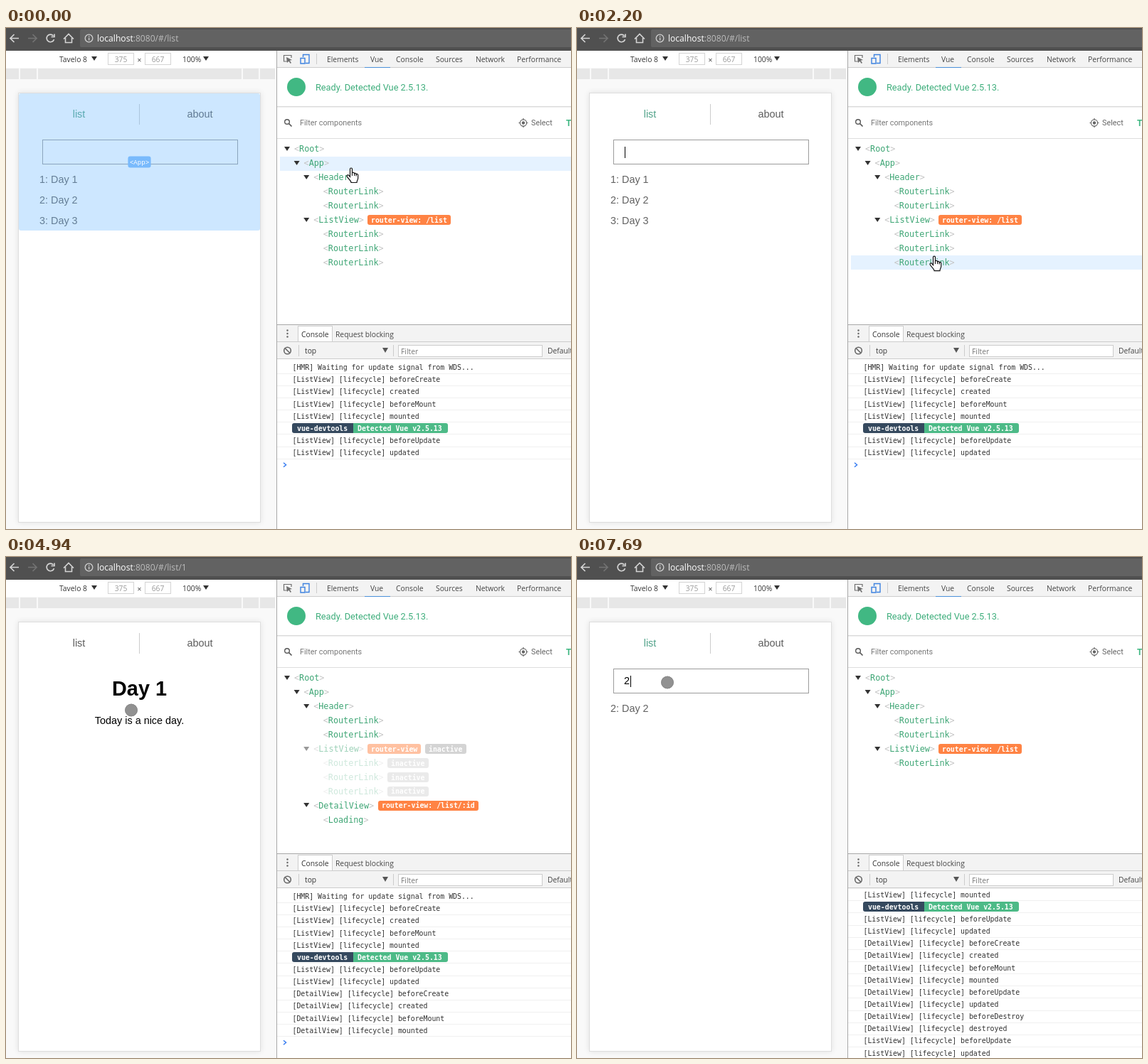
An HTML page with a canvas that plays this animation: 794x705 px, repeating every 8 s.

```html
<!DOCTYPE html>
<html lang="en">
<head>
<meta charset="utf-8">
<title>Component inspector</title>
<style>
  html, body { margin: 0; width: 100%; height: 100%; overflow: hidden; background: #fff; }
  canvas { display: block; }
</style>
</head>
<body>
<canvas id="stage" width="794" height="705"></canvas>
<script>
const c = document.getElementById('stage').getContext('2d');
const LOOP = 8000;
const UI = '10.3px "Open Sans", sans-serif';
const URL_FONT = '12.1px "Open Sans", sans-serif';
const PAGE = '14.4px "Liberation Sans", sans-serif';
const MONO = '9.87px "DejaVu Sans Mono", monospace';
const TREE = '11.75px "DejaVu Sans Mono", monospace';
const LABEL = '9.05px "Liberation Mono", monospace';
const GREEN = '#41b883', LINE = '#cccccc', BAR = '#f3f3f3';
const TREE_TOP = 160.7, ROW_H = 19.93, LOG_H = 17.15;

// time, x, y of the pointer
const path = [
  [0, 485, 197], [730, 485, 197], [1440, 498, 239], [1560, 498, 239],
  [2200, 502, 321], [2350, 503, 333], [2760, 503, 333], [2810, 502, 332],
  [2980, 502, 332], [3280, 395, 284], [3750, 176, 215], [5410, 176, 215],
  [5880, 122, 127], [6680, 122, 127], [7060, 127, 176], [LOOP, 127, 176]
];
const caretFlips = [260, 730, 1180, 1690, 2200, 2760, 3280, 3750];

// page area belonging to each tree row: x, y, width, height, name
const targets = [
  [18, 92, 339, 193, 'Root'], [18, 92, 339, 193, 'App'], [18, 107, 339, 29, 'Header'],
  [18, 107, 170, 29, 'RouterLink'], [188, 107, 169, 29, 'RouterLink'],
  [18, 136, 339, 149, 'ListView'],
  ...[0, 1, 2].map(i => [47, 199 + 29 * i, 281, 29, 'RouterLink'])
];

const cycle = (name, ...hooks) => hooks.map(h => `[${name}] [lifecycle] ${h}`);
const logs = [
  '[HMR] Waiting for update signal from WDS...',
  ...cycle('ListView', 'beforeCreate', 'created', 'beforeMount', 'mounted'),
  null, // version badge
  ...cycle('ListView', 'beforeUpdate', 'updated'),
  ...cycle('DetailView', 'beforeCreate', 'created', 'beforeMount', 'mounted',
    'beforeUpdate', 'updated', 'beforeDestroy', 'destroyed'),
  ...cycle('ListView', 'beforeUpdate', 'updated')
];

const handShape = new Path2D('M-1.5 1.5C-1.5-.5 1.5-.5 1.5 1.5V7C2 5.8 4.6 6 4.6 8C5 6.8 7.2 7 7.2 9' +
  'C8 8 9.7 8.4 9.7 10V14C9.7 17 8 17.5 8 20.5H0C0 17.5-5 14.5-6 11.5C-6.3 10-4 9-2.8 11L-1.5 12.5Z');

function text(s, x, y, font, color, align = 'left') {
  c.font = font;
  c.fillStyle = color;
  c.textAlign = align;
  c.fillText(s, x, Math.round(y));
}
function rect(x, y, w, h, color) {
  c.fillStyle = color;
  c.fillRect(x, y, w, h);
}
function frame(x, y, w, h, color, fill = '#fff') {
  rect(x, y, w, h, color);
  rect(x + 1, y + 1, w - 2, h - 2, fill);
}
function round(x, y, w, h, r, color) {
  c.fillStyle = color;
  c.beginPath();
  c.roundRect(x, y, w, h, r);
  c.fill();
}
function stroke(d, color, width = 1.5) {
  c.strokeStyle = color;
  c.lineWidth = width;
  c.stroke(new Path2D(d));
}
function disc(x, y, r, color) {
  c.fillStyle = color;
  c.beginPath();
  c.arc(x, y, r, 0, 7);
  c.fill();
}
function ring(x, y, r, color, width = 1.3) {
  c.strokeStyle = color;
  c.lineWidth = width;
  c.beginPath();
  c.arc(x, y, r, 0, 7);
  c.stroke();
}
function arrowDown(x, y, w = 8, h = 6, color = '#333') {
  c.fillStyle = color;
  c.fill(new Path2D(`M${x} ${y}h${w}l${-w / 2} ${h}z`));
}

function pointer(t) {
  const i = Math.max(1, path.findIndex(p => p[0] > t));
  const [t0, x0, y0] = path[i - 1], [t1, x1, y1] = path[i];
  const k = (t - t0) / (t1 - t0);
  return [x0 + (x1 - x0) * k, y0 + (y1 - y0) * k];
}
function hoverRow(t) {
  const [x, y] = pointer(Math.max(0, t));
  return x < 385 ? -1 : Math.floor((y - TREE_TOP) / ROW_H);
}
const logCount = t => t < 4070 ? 8 : t < 5010 ? 12 : t < 6030 ? 14 : t < 7690 ? 16 : 18;

function addressBar(detail) {
  rect(0, 0, 794, 32, '#505050');
  round(104, 2, 700, 25, 2, '#626262');
  stroke('M18 14.5H6M11.5 9L6 14.5L11.5 20', '#d4d4d4', 1.7);
  stroke('M31 14.5H43M37.5 9L43 14.5L37.5 20', '#737373', 1.7);
  stroke('M66.5 11A5.3 5.3 0 1 0 67.5 16M68 8.5V12.5H63.5', '#d4d4d4', 1.7);
  stroke('M81 15.5L88 8.5L95 15.5M83.5 14V20.5H92.5V14', '#d4d4d4', 1.6);
  ring(116.5, 14.5, 5.3, '#d0d0d0');
  rect(116, 13.5, 1.3, 4, '#d0d0d0');
  rect(116, 11, 1.3, 1.3, '#d0d0d0');
  text('localhost', 128, 19, URL_FONT, '#fff');
  const x = 128 + c.measureText('localhost').width;
  text(':8080/#/list' + (detail ? '/1' : ''), x, 19, URL_FONT, '#bcbcbc');
}

function deviceChrome() {
  rect(0, 32, 380, 673, '#f9f9f9');
  rect(0, 32, 380, 24, '#fff');
  text('Tavelo 8', 75, 48, UI, '#333');
  arrowDown(120, 40);
  frame(143, 35, 37, 17, '#d4d4d4');
  frame(195, 35, 37, 17, '#d4d4d4');
  text('375', 161.5, 48, UI, '#999', 'center');
  text('667', 213.5, 48, UI, '#999', 'center');
  text('×', 187.5, 49, UI, '#444', 'center');
  text('100%', 248, 48, UI, '#333');
  arrowDown(277, 40);
  for (const [a, b] of [[0, 18], [20, 43], [45, 331], [333, 355], [357, 378]])
    rect(a, 57, b - a, 15, '#e7e7e7');
  c.shadowColor = 'rgba(0,0,0,.1)';
  c.shadowBlur = 8;
  rect(17, 91, 341, 605, '#dedede');
  c.shadowColor = 'transparent';
  rect(18, 92, 339, 603, '#fff');
}

function page(t, detail) {
  text('list', 102.5, 126, PAGE, detail ? '#5c5c5c' : '#51a289', 'center');
  text('about', 272.5, 126, PAGE, '#5c5c5c', 'center');
  rect(187, 107, 1, 29, LINE);
  if (detail) {
    if (t < 4940) text('Loading...', 187.5, 164, PAGE, '#000', 'center');
    else {
      text('Day 1', 187.5, 195, 'bold 28.8px "Liberation Sans", sans-serif', '#000', 'center');
      text('Today is a nice day.', 187.5, 235, PAGE, '#000', 'center');
    }
    return;
  }
  const typed = t >= 7610;
  frame(51, 157, 275, 35, '#9c9c9c');
  if (typed) text('2', 66, 179, PAGE, '#000');
  const blink = t < 4070 ? caretFlips.filter(f => f <= t).length % 2 : t >= 7290;
  if (blink) rect(typed ? 75 : 67, 167, 1, 16, '#000');
  (typed ? [2] : [1, 2, 3]).forEach((n, i) =>
    text(`${n}: Day ${n}`, 47, 218 + 29 * i, PAGE, '#626262'));
}

function overlay(t) {
  const row = hoverRow(t);
  if (row < 0 || row !== hoverRow(t - 60) || !targets[row]) return;
  const [x, y, w, h, name] = targets[row];
  round(x, y, w, h, 3, 'rgba(104,182,255,.33)');
  const label = `<${name}>`, lw = label.length * 5.43 + 5;
  const cx = x + w / 2, cy = y + h / 2;
  round(cx - lw / 2, cy - 8, lw, 16, 3, '#79bafc');
  text(label, cx, cy + 3.5, LABEL, '#fff', 'center');
}

function statusBubble(t) {
  for (const [start, url] of [[4070, '/list/1'], [6030, '/list']]) {
    const age = t - start;
    if (age < 80 || age > 490) continue;
    c.globalAlpha = Math.min(1, (490 - age) / 170);
    round(18, 676, 111, 19, [0, 3, 0, 0], '#cfcfcf');
    round(18, 677, 110, 18, [0, 3, 0, 0], '#f2f2f2');
    text('localhost:8080/#' + url, 22, 690, UI, '#777');
    c.globalAlpha = 1;
  }
}

function inspectorHead() {
  rect(380, 32, 414, 673, '#fff');
  rect(380, 32, 414, 23, BAR);
  rect(380, 55, 414, 1, LINE);
  stroke('M396 47H390.5V38.5H401V42', '#6e6e6e', 1.2);
  c.fillStyle = '#6e6e6e';
  c.fill(new Path2D('M394 41L402 45L398.7 45.7L401 49L399.7 50L397.4 46.7L395 49z'));
  stroke('M417.5 41V37.5H426V49.5H421M414 42.5H420V50H414Z', '#3d82e0', 1.4);
  rect(436, 36, 1, 15, LINE);
  [['Elements', 451], ['Vue', 512], ['Console', 548], ['Sources', 604],
    ['Network', 660], ['Performance', 718]].forEach(([s, x]) => text(s, x, 48, UI, '#444'));
  rect(504, 55, 36, 1, '#4a90d9');

  disc(408, 83, 13, GREEN);
  text('Ready. Detected Vue 2.5.13.', 435, 88, '12.75px Roboto, sans-serif', '#3fae7c');
  rect(381, 110, 413, 1, '#d9d9d9');
  rect(381, 111, 413, 1, '#efefef');
  ring(395, 132, 3.3, '#555', 1.4);
  stroke('M397.5 134.5L401.5 138.5', '#555', 1.7);
  text('Filter components', 413, 137, '10.8px Roboto, sans-serif', '#777');
  ring(727, 133.5, 4.6, '#666', 1.2);
  disc(727, 133.5, 2.2, '#666');
  stroke('M727 127V129M727 138V140M720.5 133.5H722.5M731.5 133.5H733.5', '#666', 1.2);
  text('Select', 738, 137, '10.8px Roboto, sans-serif', '#666');
  text('T', 787, 138, 'bold 12px Roboto, sans-serif', GREEN);
  rect(381, 155, 413, 1, '#dedede');
}

function badge(s, x, y, color, alpha) {
  const w = Math.round(s.length * 5.95 + 10);
  x = Math.round(x);
  c.globalAlpha = alpha;
  round(x, Math.round(y - 6.5), w, 14, 3, color);
  c.globalAlpha = 1; // white lettering stays white on a faded badge
  text(s, x + 5, y + 4, 'bold ' + MONO, '#fff');
  return x + w + 5.5;
}

function treeRow(i, depth, name, { open, badges = [], alpha = 1 } = {}) {
  const y = 170 + ROW_H * i;
  let x = 405 + 13.6 * depth;
  c.globalAlpha = alpha;
  if (open) arrowDown(x - 14, Math.round(y - 3), 8, 6, '#333');
  for (const [s, color] of [['<', '#c4c4c4'], [name, '#3da574'], ['>', '#c4c4c4']]) {
    text(s, x, y + 4.2, TREE, color);
    x += c.measureText(s).width;
  }
  x += 5.5;
  for (const s of badges) x = badge(s, x, y, s === 'inactive' ? '#aaa' : '#ff8344', alpha);
  c.globalAlpha = 1;
}

function tree(t) {
  const row = hoverRow(t);
  if (row >= 0) rect(385, Math.round(TREE_TOP + ROW_H * row), 409, 20, '#e5f2ff');
  const detail = t >= 4160 && t < 6120;
  treeRow(0, 0, 'Root', { open: true });
  treeRow(1, 1, 'App', { open: true });
  treeRow(2, 2, 'Header', { open: true });
  treeRow(3, 3, 'RouterLink');
  treeRow(4, 3, 'RouterLink');
  treeRow(5, 2, 'ListView', detail
    ? { open: true, badges: ['router-view', 'inactive'], alpha: .5 }
    : { open: true, badges: ['router-view: /list'] });
  const links = t < 7690 ? 3 : 1;
  for (let i = 0; i < links; i++)
    treeRow(6 + i, 3, 'RouterLink', detail ? { badges: ['inactive'], alpha: .25 } : {});
  if (!detail) return;
  const loading = t < 5010;
  treeRow(9, 2, 'DetailView', { open: loading, badges: ['router-view: /list/:id'] });
  if (loading) treeRow(10, 3, 'Loading');
}

function consolePanel(t) {
  rect(380, 417, 414, 49, BAR);
  rect(380, 417, 414, 1, '#a8a8a8');
  rect(380, 441, 414, 1, LINE);
  rect(380, 465, 414, 1, LINE);
  for (const y of [425.5, 430, 434.5]) disc(395.5, y, 1.2, '#666');
  rect(410, 419, 49, 22, LINE);
  rect(411, 420, 47, 21, '#fff');
  text('Console', 415, 435, UI, '#333');
  text('Request blocking', 463, 435, UI, '#444');
  ring(395.5, 454, 4.8, '#666', 1.6);
  stroke('M392 450.5L399 457.5', '#666', 1.6);
  rect(411, 446, 1, 16, LINE);
  text('top', 420, 458, UI, '#333');
  arrowDown(529, 450, 8, 7, '#555');
  rect(544, 446, 1, 16, LINE);
  frame(551, 446, 203, 17, LINE);
  text('Filter', 555, 459, UI, '#777');
  text('Default levels', 761, 458, UI, '#444');

  const n = logCount(t);
  const top = Math.min(477.5, 698 - (n - 1) * LOG_H);
  c.save();
  c.beginPath();
  c.rect(381, 466, 413, 239);
  c.clip();
  logs.slice(0, n).forEach((s, i) => {
    const y = top + LOG_H * i;
    rect(381, Math.round(y + 8.2), 413, 1, '#f0f0f0');
    if (s) return text(s, 402.5, y + 3.6, MONO, '#303030');
    const boxTop = Math.round(y - 7);
    round(402, boxTop, 86, 14, [3, 0, 0, 3], '#35495e');
    round(488, boxTop, 133, 14, [0, 3, 3, 0], '#4dba87');
    text('vue-devtools', 409, y + 3.6, 'bold ' + MONO, '#fff');
    text('Detected Vue v2.5.13', 494, y + 3.6, 'bold ' + MONO, '#fff');
  });
  const y = top + LOG_H * n;
  stroke(`M390 ${y - 3}L393.5 ${y}L390 ${y + 3}`, '#367cf1', 1.5);
  c.restore();
}

function cursor(t) {
  const [x, y] = pointer(t);
  if (x < 370) {
    disc(x, y + .5, 8.8, '#919191');
    ring(x, y + .5, 8.4, '#878787', 1);
    return;
  }
  c.save();
  c.translate(x, y);
  c.fillStyle = '#fff';
  c.strokeStyle = '#111';
  c.lineWidth = 1.2;
  c.fill(handShape);
  c.stroke(handShape);
  c.restore();
  stroke(`M${x + 1.5} ${y + 7}v4M${x + 4.6} ${y + 8}v3M${x + 7.2} ${y + 9}v2.5`, '#111', 1);
}

function draw(now) {
  const t = now % LOOP;
  const detail = t >= 4070 && t < 6030;
  addressBar(detail);
  deviceChrome();
  page(t, detail);
  overlay(t);
  statusBubble(t);
  inspectorHead();
  tree(t);
  consolePanel(t);
  rect(380, 32, 1, 673, '#a8a8a8');
  cursor(t);
  requestAnimationFrame(draw);
}
requestAnimationFrame(draw);
</script>
</body>
</html>
```
